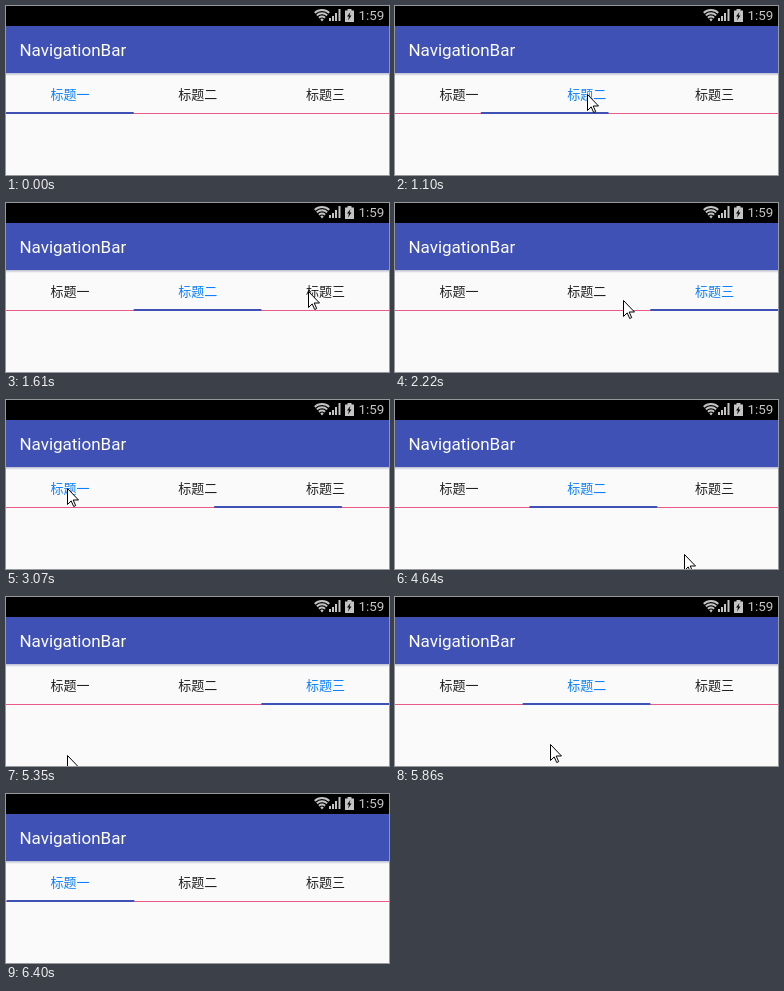
These frames come from a looping animation (383x169 px, 6.96 s). An HTML page:

```html
<!DOCTYPE html>
<html lang="zh-CN">
<head>
<meta charset="utf-8">
<title>NavigationBar</title>
<style>
  html, body { margin: 0; width: 100%; height: 100%; overflow: hidden; background: #fafafa; }
  svg { display: block; width: 383px; height: 169px; }
  text { font-family: Roboto, "Noto Sans", sans-serif; }
  .tab { font: 13px "Noto Sans CJK SC", "Noto Sans CJK", sans-serif; text-anchor: middle; fill: #212121; }
  .tab.on { fill: #0c80ff; }
</style>
</head>
<body>
<svg viewBox="0 0 383 169">
  <defs>
    <linearGradient id="shade" x2="0" y2="1">
      <stop stop-color="#b9bcd0"/>
      <stop offset="1" stop-color="#fafafa"/>
    </linearGradient>
    <clipPath id="fan"><path d="M308 6L316 15.500 324 6V0H308z"/></clipPath>
  </defs>
  <rect width="383" height="20"/>
  <g fill="#c4c4c4">
    <g clip-path="url(#fan)" fill="none" stroke="#c4c4c4" stroke-width="2">
      <circle cx="316" cy="14.500" r="10.500"/>
      <circle cx="316" cy="14.500" r="7.300"/>
      <circle cx="316" cy="14.500" r="4.100"/>
      <circle cx="316" cy="14.500" r="1"/>
    </g>
    <path d="M324 15v-3M327 15v-5M330 15v-8M333.500 15V3" stroke="#c4c4c4" stroke-width="2"/>
    <path d="M339 4.500h2.500V3h4v1.500H348V16h-9z"/>
    <path d="M344.500 6L341 10.500h2l-1 4 3.500-5h-2z" fill="#000"/>
    <text x="352.500" y="14" font-size="13.400">1:59</text>
  </g>
  <rect y="20" width="383" height="47" fill="#3f51b5"/>
  <rect y="67" width="383" height="3" fill="url(#shade)"/>
  <text x="13.400" y="49.500" font-size="17" fill="#fff">NavigationBar</text>
  <text class="tab" x="64" y="93">标题一</text>
  <text class="tab" x="191.700" y="93">标题二</text>
  <text class="tab" x="319.500" y="93">标题三</text>
  <rect y="107" width="383" height="1" fill="#ea5a87"/>
  <rect id="bar" y="106" width="127.700" height="2" fill="#3f51b5"/>
  <path id="cursor" d="M.5.5v16l3.700-3.600 2.500 5.600 2-.9-2.500-5.600h5.300z" fill="#fff" stroke="#000"/>
</svg>
<script>
const LOOP = 6960, STEP = 60, WIDTH = 383, TAB = WIDTH / 3;
const DRAG = 200, SETTLE = 100, REACH = .536; // a swipe drags to REACH of a page, then settles
const ENTER = 280, LEAVE = 6400;
const bar = document.getElementById('bar');
const cursor = document.getElementById('cursor');
const tabs = document.querySelectorAll('.tab');

const turns = [{ at: -20, from: 0, to: 0, lead: 0 }];
const glides = [{ at: 0, x: 192, y: 158, ms: 1 }];

function glide(at, x, y, ms = 420) {
  glides.push({ at, x, y, ms });
}

function tap(at, to, lead) {
  turns.push({ at, from: turns.at(-1).to, to, lead });
}

function swipe(at, to, lead = 20) {
  const from = turns.at(-1).to, { x, y } = glides.at(-1);
  turns.push({ at, from, to, lead, drag: true });
  glide(at - lead, x - (to - from) * REACH * WIDTH, y, DRAG);
}

glide(ENTER, 192, 88);
tap(1100, 1, 40);
glide(1190, 310, 88);
tap(1920, 2, 40);
glide(1920, 228, 97, 300);
glide(2220, 61, 88, 450);
tap(3070, 0, 12);
glide(3130, 239, 146);
swipe(3800, 1);
glide(4040, 310, 154);
swipe(4640, 2);
glide(4850, 61, 158, 350);
swipe(5370, 1, 0);
glide(5590, 100, 142, 390);
swipe(6130, 0);

const clamp = p => Math.min(1, Math.max(0, p));
const settle = p => 1 - (1 - clamp(p)) ** 5;

function turned({ from, to, drag }, ms) {
  if (!drag) return settle(ms / (100 + 100 * Math.abs(to - from)));
  if (ms < DRAG) return REACH * ms / DRAG;
  return REACH + (1 - REACH) * settle((ms - DRAG) / SETTLE);
}

function draw(now) {
  const turn = turns.findLast(k => k.at <= now);
  const { at, from, to, lead, drag } = turn;
  const held = Math.floor((now - at) / STEP) * STEP;
  const ms = held + lead, t = at + held;

  const page = from + (to - from) * turned(turn, ms);
  const selected = drag && ms < DRAG ? from : to;
  bar.setAttribute('x', page * TAB);
  tabs.forEach((tab, i) => tab.classList.toggle('on', i === selected));

  const i = Math.max(1, glides.findLastIndex(g => g.at <= t));
  const a = glides[i - 1], b = glides[i], p = clamp((t - b.at) / b.ms);
  const x = Math.round(a.x + (b.x - a.x) * p), y = Math.round(a.y + (b.y - a.y) * p);
  cursor.setAttribute('transform', `translate(${x} ${y})`);
  cursor.setAttribute('visibility', now >= ENTER && now < LEAVE ? 'visible' : 'hidden');
}

const origin = performance.now();
function tick() {
  draw((performance.now() - origin) % LOOP);
  requestAnimationFrame(tick);
}
tick();
</script>
</body>
</html>
```
